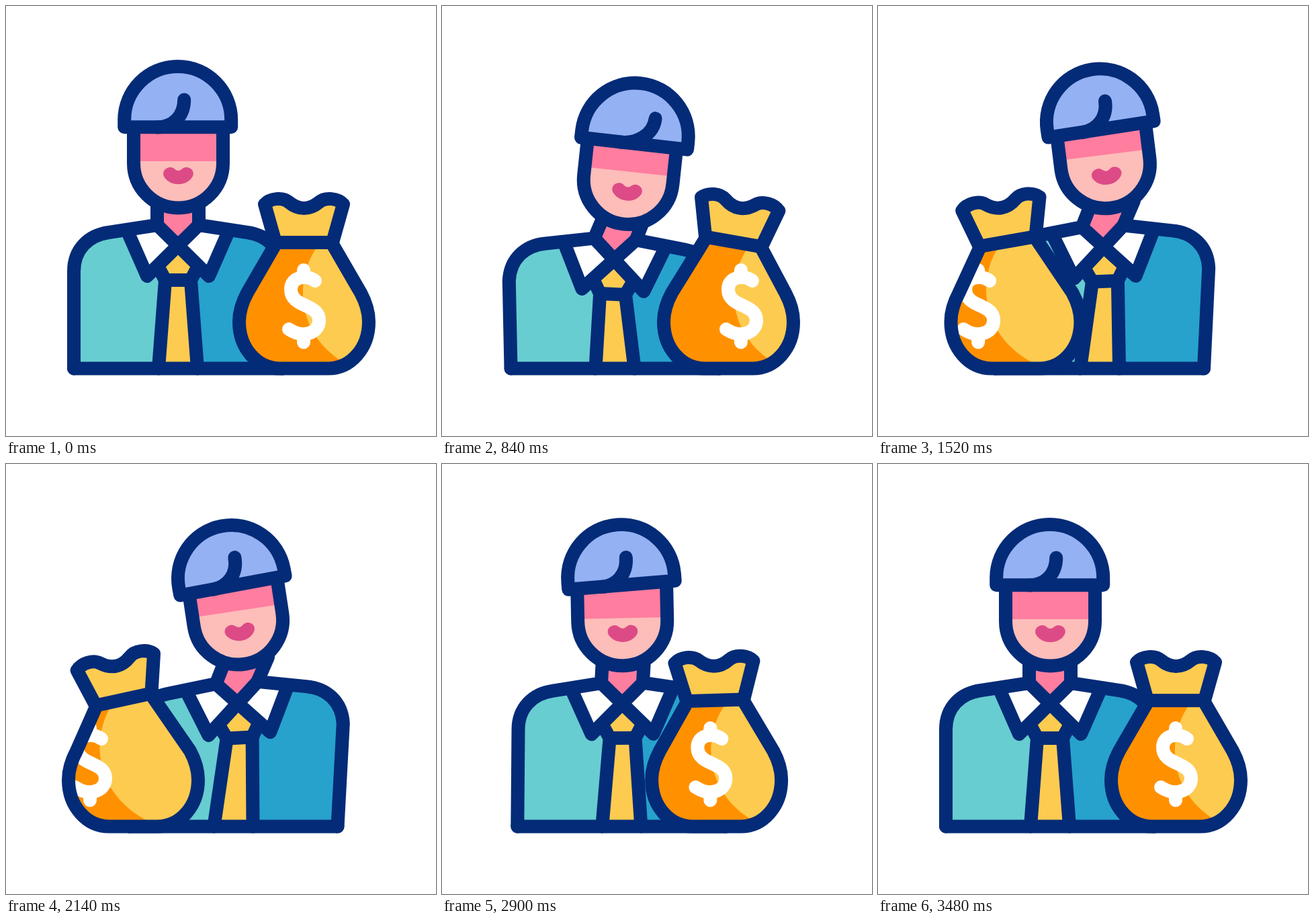
Write an HTML page with a canvas that moves like this. It is 640 px wide and 640 px high and loops after 3.6 s.

```html
<!DOCTYPE html>
<html lang="en">
<head>
<meta charset="utf-8">
<title>Man with money bag</title>
<style>
html, body { margin: 0; width: 100%; height: 100%; overflow: hidden; background: #fff; }
canvas { display: block; width: 640px; height: 640px; }
</style>
</head>
<body>
<canvas id="stage" width="640" height="640"></canvas>
<script>
const ctx = document.getElementById('stage').getContext('2d');
const LOOP = 3600, FLOOR = 539.5;
const INK = '#042b77', TEAL = '#67cdd0', BLUE = '#27a2cc', YELLOW = '#fdcb50', ORANGE = '#ff9100';
const HAIR = '#94b1f3', SHADE = '#ff7d9f', SKIN = '#fdbdb9', LIPS = '#dd4b86', WHITE = '#fff';

// Timing curve with control points (a, 0) and (b, 1).
const ease = (a, b) => u => {
  if (u <= 0) return 0;
  if (u >= 1) return 1;
  let lo = 0, hi = 1;
  for (let i = 0; i < 24; i++) {
    const s = (lo + hi) / 2, r = 1 - s;
    if (3 * s * r * r * a + 3 * s * s * r * b + s * s * s < u) lo = s; else hi = s;
  }
  return lo * lo * (3 - 2 * lo);
};
const quick = ease(.49, .15), late = ease(.74, .27), soft = ease(.6, .53);
const lerp = (a, b, k) => a + (b - a) * k;

// Blends rest -> crouch -> lean -> rest.
function blend(t, rest, crouch, lean, go = late, back = quick) {
  if (t < 640) return lerp(rest, crouch, quick(t / 600));
  if (t < 2160) return lerp(crouch, lean, go((t - 640) / 1280));
  return lerp(lean, rest, back((t - 2160) / 1290));
}

// Maps coordinate pairs: rotation about a pivot, which itself moves to (toX, toY).
function mapper(pivotX, pivotY, toX, toY, degrees) {
  const c = Math.cos(degrees * Math.PI / 180), s = Math.sin(degrees * Math.PI / 180);
  return (...xy) => {
    const out = [];
    for (let i = 0; i < xy.length; i += 2) {
      const x = xy[i] - pivotX, y = xy[i + 1] - pivotY;
      out.push(toX + x * c - y * s, toY + x * s + y * c);
    }
    return out;
  };
}

// Two numbers make a line, six a curve; the first entry starts the path.
function trace(points, closed) {
  const path = new Path2D();
  points.forEach((p, i) => {
    if (!i) path.moveTo(...p);
    else if (p.length === 2) path.lineTo(...p);
    else path.bezierCurveTo(...p);
  });
  if (closed) path.closePath();
  return path;
}
function fill(color, ...points) {
  ctx.fillStyle = color;
  ctx.fill(trace(points, true));
}
function stroke(color, ...points) {
  ctx.strokeStyle = color;
  ctx.stroke(trace(points));
}

function drawBody(t) {
  const shift = blend(t, 0, 0, 82.5);
  const topX = blend(t, 0, -1.4, 89), topY = blend(t, 0, 21.3, -.5);
  const up = mapper(256, 357, 256 + topX, 357 + topY, blend(t, 0, 2.6, -3));
  const low = x => [x + shift, FLOOR];
  const lean = blend(t, 0, 17, 14);
  const neck = x => [x + topX + lean, 288 + topY];

  const left = [low(101), up(101, 395), up(101, 362, 123, 341, 153, 337), up(225, 326)];
  const right = [low(411), up(411, 395), up(411, 362, 389, 341, 359, 337), up(287, 326)];
  fill(TEAL, ...left, up(256, 357), low(256));
  fill(BLUE, ...right, up(256, 357), low(256));
  fill(SHADE, neck(225), neck(287), up(287, 326), up(256, 357), up(225, 326));
  fill(WHITE, up(181, 336), up(225, 326), up(256, 357), up(210, 402));
  fill(WHITE, up(331, 336), up(287, 326), up(256, 357), up(302, 402));
  fill(YELLOW, up(256, 357), up(284, 385), up(283, 393), up(275, 408), low(285),
    low(227), up(237, 408), up(229, 393), up(228, 385));

  stroke(INK, ...left, neck(225));
  stroke(INK, ...right, neck(287));
  stroke(INK, low(101), low(411));
  stroke(INK, up(181, 336), up(210, 402), up(287, 326));
  stroke(INK, up(331, 336), up(302, 402), up(225, 326));
  stroke(INK, up(229, 393), up(237, 408), low(227));
  stroke(INK, up(283, 393), up(275, 408), low(285));
  stroke(INK, up(237, 408), up(275, 408));
}

function drawFace(t) {
  const at = mapper(0, 0, blend(t, 256.5, 276, 345.5), blend(t, 234, 259, 232), blend(t, 0, 6.4, -8.6));
  const shade = blend(t, -3, -12, -13.5);
  const r = 66.5, k = r * .5523;
  const outline = [at(-r, -58), at(-r, 0), at(-r, k, -k, r, 0, r), at(k, r, r, k, r, 0), at(r, -58)];
  fill(SKIN, ...outline);
  fill(SHADE, at(-r, -58), at(r, -58), at(r, shade), at(-r, shade));
  fill(LIPS, at(-12, 6), at(-6, 6, -5, 11, 0, 11), at(5, 11, 6, 6, 12, 6),
    at(23, 7, 25, 17, 19, 23), at(10, 34, -10, 34, -19, 23), at(-25, 17, -23, 7, -12, 6));
  stroke(INK, ...outline);
}

function drawHair(t) {
  const at = mapper(0, 0, blend(t, 255.7, 286.3, 335.5), blend(t, 169.5, 194.5, 170.5),
    blend(t, 0, 6.8, -10.5, late, soft));
  const r = 79.5, k = r * .5523;
  const dome = [at(-r, 10.7), at(-r, 0), at(-r, -k, -k, -r, 0, -r), at(k, -r, r, -k, r, 0),
    at(r, 10.7), at(-r, 10.7)];
  const curl = blend(t, 0, 18, 1), root = curl * .6;
  fill(HAIR, ...dome);
  stroke(INK, ...dome);
  stroke(INK, at(9.5 + curl, -30), at(9.5 + curl, -5, -8 + root, 11, -31 + root, 11));
}

function drawBag(t) {
  const x = blend(t, 443.5, 438.7, 189.5, quick);
  const base = mapper(0, 0, x, 0, 0);
  const up = mapper(0, 352, x + blend(t, 0, 7.8, -14.5), blend(t, 352, 351, 350.5), blend(t, 0, 10.3, -12.3));
  const sack = [up(-41, 352), base(-84.5, 427), base(-91.5, 440, -96.5, 455, -96.5, 470),
    base(-96.5, 510, -69, FLOOR, -36, FLOOR), base(36, FLOOR), base(69, FLOOR, 96.5, 510, 96.5, 470),
    base(96.5, 455, 91.5, 440, 84.5, 427), up(41, 352), up(-41, 352)];
  const lip = [up(-43, 350), up(-58.5, 295), up(-50, 286, -32, 284, -22.5, 292),
    up(-8, 304, 8, 304, 22.5, 292), up(32, 284, 50, 286, 58.5, 295), up(43, 350)];

  fill(YELLOW, ...lip);
  stroke(INK, ...lip);
  fill(ORANGE, ...sack);

  ctx.save();
  ctx.clip(trace(sack, true));
  const glow = blend(t, 0, 10.5, -48);
  fill(YELLOW, base(22 + glow * 1.08, 355),
    base(-16 + glow, 405, -12 + glow, 490, 62 + glow * .82, 532),
    base(62 + glow * .82, 560), base(130, 560), base(130, 330), base(22 + glow * 1.08, 330));
  const coin = mapper(443.5, 0, x + blend(t, 0, 20.5, -64), 0, 0);
  stroke(WHITE, coin(460, 409), coin(448, 400, 424, 402, 424, 422), coin(424, 438, 440, 443, 448, 447),
    coin(459, 452, 466, 457, 466, 468), coin(466, 487, 442, 495, 421, 481));
  stroke(WHITE, coin(443, 393), coin(443, 402));
  stroke(WHITE, coin(443, 490), coin(443, 500.5));
  ctx.restore();

  stroke(INK, ...sack);
}

function draw(t) {
  ctx.fillStyle = WHITE;
  ctx.fillRect(0, 0, 640, 640);
  ctx.lineWidth = 20;
  ctx.lineCap = ctx.lineJoin = 'round';
  drawBody(t);
  drawFace(t);
  drawHair(t);
  drawBag(t);
}

const start = performance.now();
function tick() {
  draw((performance.now() - start) % LOOP);
  requestAnimationFrame(tick);
}
tick();
</script>
</body>
</html>
```
